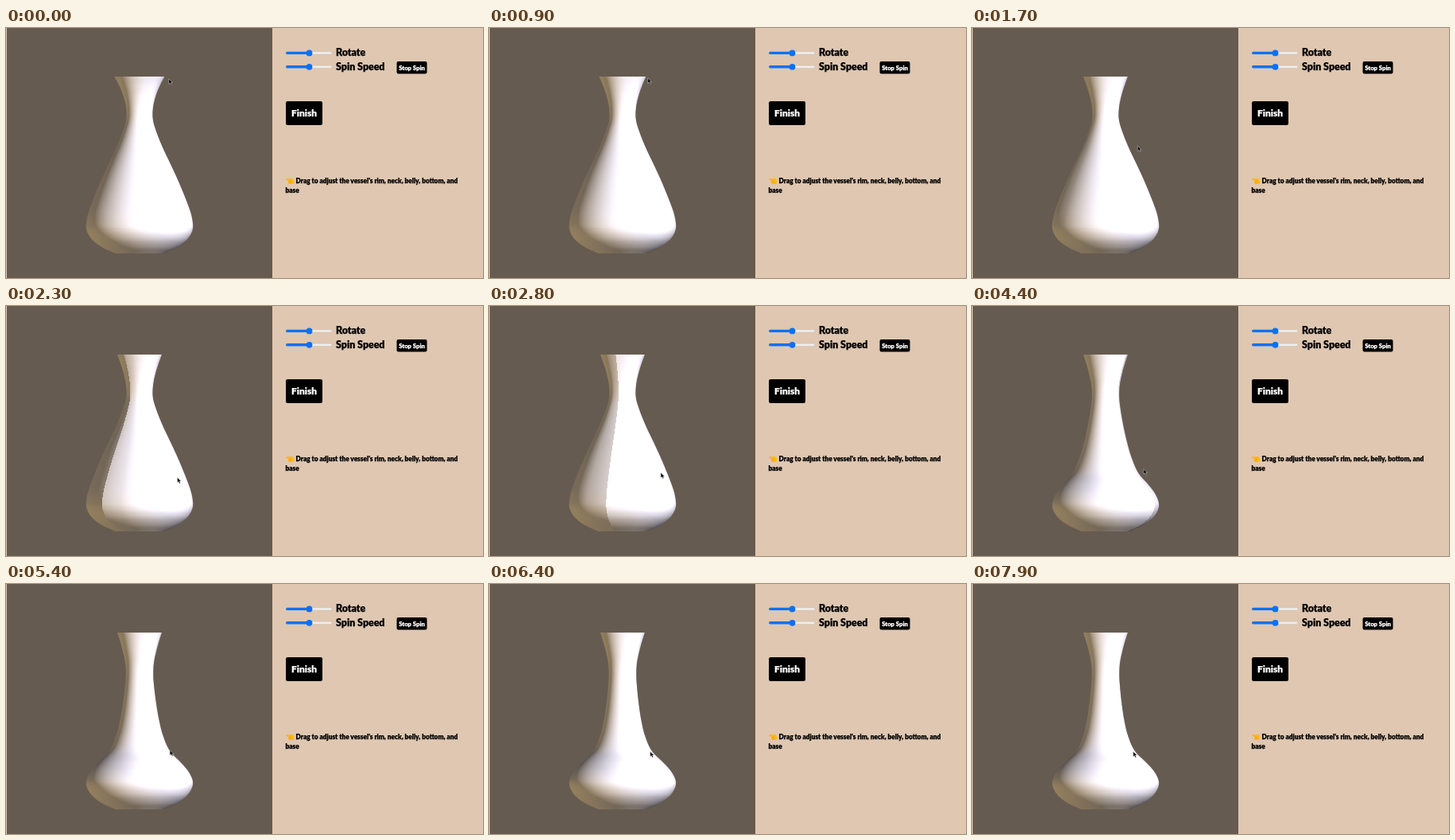
Recreate the animation shown at these times as an HTML page with a canvas. Size 600 by 314 pixels, loop 8000 ms.

```html
<!DOCTYPE html>
<html lang="en">
<head>
<meta charset="utf-8">
<title>Vessel editor</title>
<style>
html, body { margin: 0; width: 100%; height: 100%; overflow: hidden; background: #dfc7b1; }
#stage { position: relative; width: 600px; height: 314px; overflow: hidden; }
canvas, svg { position: absolute; left: 0; top: 0; }
text { font-family: Lato, "Open Sans", sans-serif; font-weight: 900; fill: #000; stroke: #000; stroke-width: .25px; }
.label { font-size: 12.4px; }
.hint { font-size: 8.3px; }
.button { fill: #fff; stroke: #fff; text-anchor: middle; }
</style>
</head>
<body>
<div id="stage">
  <canvas id="view" width="335" height="314"></canvas>
  <svg width="600" height="314" viewBox="0 0 600 314">
    <defs>
      <g id="slider">
        <rect x=".3" y="-1.6" width="57.6" height="3.2" rx="1.6" fill="#f1efed" stroke="#c6b9ad" stroke-width=".5"/>
        <rect y="-1.7" width="30" height="3.4" rx="1.7" fill="#0871f4"/>
        <circle cx="29.5" r="3.9" fill="#0871f4"/>
      </g>
    </defs>
    <use href="#slider" x="352" y="31.4"/>
    <use href="#slider" x="352" y="48.8"/>
    <text class="label" x="415" y="35.3">Rotate</text>
    <text class="label" x="415" y="52.7">Spin Speed</text>
    <rect x="491.5" y="42" width="38" height="15.6" rx="2"/>
    <text class="button" x="510.5" y="52.6" font-size="7.7">Stop Spin</text>
    <rect x="352" y="92" width="46" height="30" rx="2.2"/>
    <text class="button" x="375" y="110.8" font-size="11.9">Finish</text>
    <path d="M352 190.2q0-1.3 1.4-1.2l4.2.2q1.6-1.1 3 .2l1.6 1.6v4l-1.4.9h-4.6q-1.4-.3-1.2-1.6l-.2-2.6-1.6-.3q-1.2-.1-1.2-1.2z" fill="#fbb81c"/>
    <path d="M356 192.4h3M356.200 194.100h2.600" stroke="#d98a12" stroke-width=".5"/>
    <text class="hint" x="364.500" y="194.600">Drag to adjust the vessel's rim, neck, belly, bottom, and</text>
    <text class="hint" x="351.500" y="207">base</text>
    <path id="cursor" d="M0 0V6.300L1.500 5 2.600 7.400 3.800 6.900 2.800 4.600H4.700z" fill="#000" stroke="#d8d5d2" stroke-width=".5"/>
  </svg>
</div>
<script>
const LOOP = 8000, STEP = 100;
const AXIS = 168, TOP = 61, BASE = 283, LEFT = 98, WIDTH = 140;
const ctx = document.getElementById('view').getContext('2d');
const cursor = document.getElementById('cursor');
const body = ctx.createImageData(WIDTH, BASE - TOP);

// height, radius with a full belly, radius with a slim belly
const profile = [
  [61, 28, 28], [72, 24, 24.5], [85, 20, 21], [100, 17, 18], [115, 16.8, 17.3],
  [130, 21, 18.2], [150, 29, 20.3], [170, 38.5, 23.3], [190, 47.8, 28],
  [210, 56.2, 37], [225, 62, 52], [235, 65.2, 60.8], [245, 67, 66.2],
  [252, 67, 67], [260, 64, 64], [268, 57.500, 57.500], [276, 46, 46], [283, 30.500, 30.500]
];

// time, value...
const rimKeys = [[0, 3.5], [900, 1.5], [1200, 0]];
const slimKeys = [[3300, 0], [4300, .77], [4700, .77], [5700, 1]];
const cursorKeys = [
  [0, 204.700, 64], [900, 199.700, 63], [1300, 198, 63], [2000, 216, 212],
  [2300, 215.500, 215.500], [3200, 216.500, 204.500], [4400, 215.800, 204.800],
  [4700, 214, 205], [5700, 202.800, 210.500]
];

function track(keys, t) {
  const next = keys.findIndex(k => k[0] > t);
  if (next === 0) return keys[0].slice(1);
  if (next < 0) return keys[keys.length - 1].slice(1);
  const a = keys[next - 1], b = keys[next];
  const f = (t - a[0]) / (b[0] - a[0]);
  return a.slice(1).map((v, i) => v + (b[i + 1] - v) * f);
}

function makeRadius(rim, slim) {
  const pts = profile.map(([y, full, thin]) => [
    y, full + (thin - full) * slim + rim * Math.max(0, 1 - (y - TOP) / 39) ** 2
  ]);
  const last = pts.length - 1;
  const slope = i => {
    const a = pts[Math.max(0, i - 1)], b = pts[Math.min(last, i + 1)];
    return (b[1] - a[1]) / (b[0] - a[0]);
  };
  return y => {
    let i = 0;
    while (i < last - 1 && pts[i + 1][0] < y) i++;
    const [y0, r0] = pts[i], [y1, r1] = pts[i + 1];
    const h = y1 - y0, s = (y - y0) / h, q = 1 - s;
    return r0 * (1 + 2 * s) * q * q + r1 * s * s * (3 - 2 * s)
      + h * s * q * (slope(i) * q - slope(i + 1) * s);
  };
}

// The mesh ends meet in a seam, where the normals turn apart.
function seamTurn(angle, seam) {
  const d = Math.atan2(Math.sin(angle - seam), Math.cos(angle - seam));
  return Math.sign(d) * .2 * Math.max(0, 1 - Math.abs(d) / .42);
}

function drawVessel(radius, seam) {
  const data = body.data;
  data.fill(0);
  for (let row = 0; row < BASE - TOP; row++) {
    const y = TOP + row + .5, r = radius(y);
    const dr = radius(Math.min(BASE, y + .5)) - radius(y - .5);
    const flat = 1 / Math.hypot(1, dr), ny = dr * flat;
    for (let col = 0; col < WIDTH; col++) {
      const x = LEFT + col + .5 - AXIS;
      const cover = Math.min(1, (r - Math.abs(x)) * flat + .5);
      if (cover <= 0) continue;
      const angle = Math.asin(Math.max(-1, Math.min(1, x / r)));
      const turned = angle + seamTurn(angle, seam);
      const nx = Math.sin(turned) * flat, nz = Math.cos(turned) * flat;
      const key = Math.max(0, .55 * nx + .3 * ny + .78 * nz);
      const warm = Math.max(0, -.85 * nx - .5 * ny + .1 * nz);
      const i = 4 * (row * WIDTH + col);
      data[i] = 255 * (.29 + .95 * key + .29 * warm);
      data[i + 1] = 255 * (.28 + .94 * key + .22 * warm);
      data[i + 2] = 255 * (.31 + .97 * key + .06 * warm);
      data[i + 3] = 255 * cover;
    }
  }
}

const layer = document.createElement('canvas');
layer.width = WIDTH;
layer.height = BASE - TOP;
const layerCtx = layer.getContext('2d');

function draw(t) {
  const [rim] = track(rimKeys, t), [slim] = track(slimKeys, t);
  const [cx, cy] = track(cursorKeys, t);
  drawVessel(makeRadius(rim, slim), .06 + (t - 3200) * .00093);
  layerCtx.putImageData(body, 0, 0);
  ctx.fillStyle = '#dfc7b1';
  ctx.fillRect(0, 0, 1, 314);
  ctx.fillStyle = '#665b50';
  ctx.fillRect(1, 0, 334, 314);
  ctx.drawImage(layer, LEFT, TOP);
  cursor.setAttribute('transform', `translate(${cx} ${cy})`);
}

const start = performance.now();
let shown = -1;
function frame() {
  const t = Math.floor((performance.now() - start) % LOOP / STEP) * STEP;
  if (t !== shown) draw(shown = t);
  requestAnimationFrame(frame);
}
frame();
</script>
</body>
</html>
```
